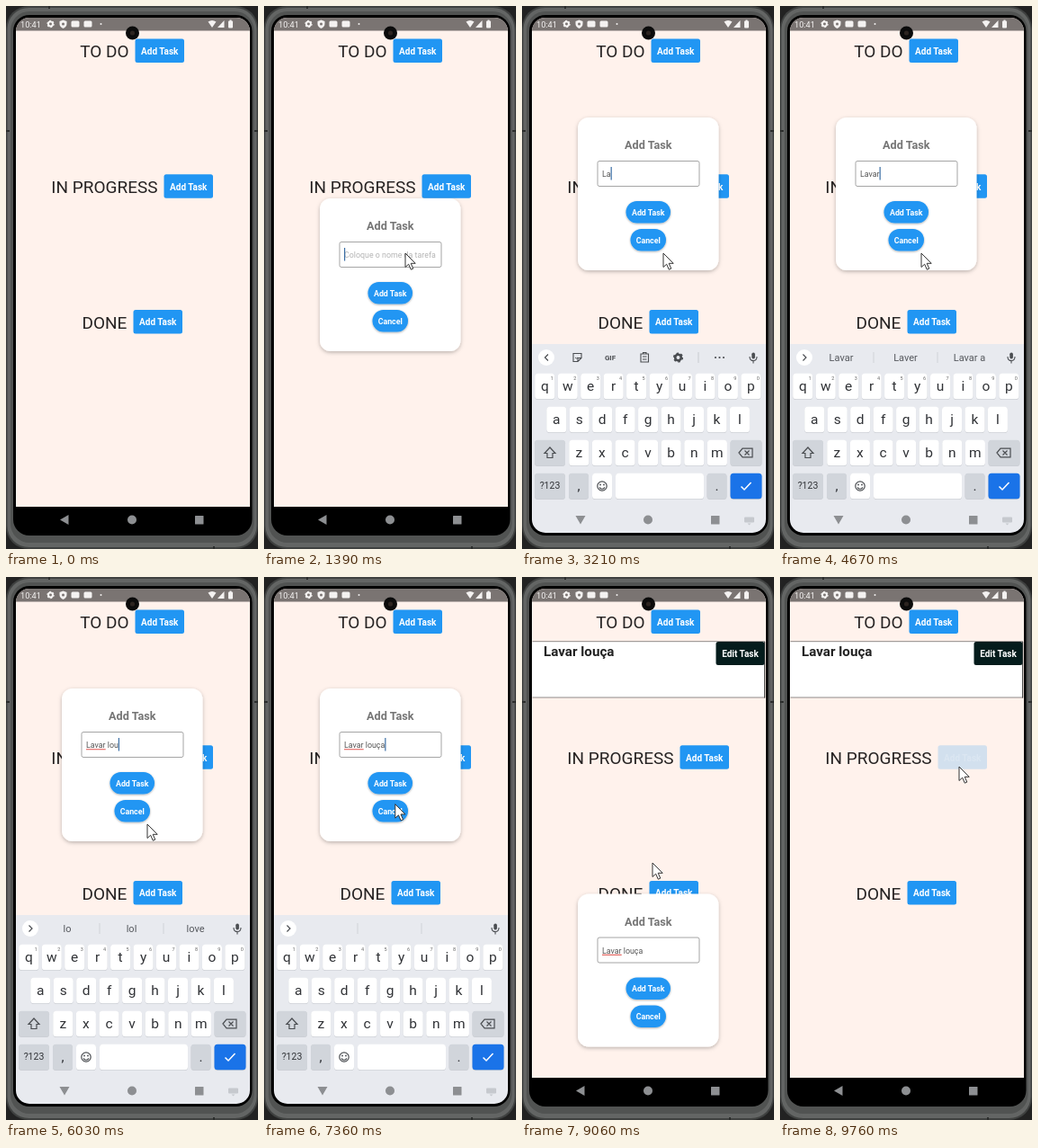
An HTML page that plays this animation: 280x604 px, repeating every 10000 ms.

```html
<!DOCTYPE html>
<html lang="pt">
<head>
<meta charset="utf-8">
<title>Task board</title>
<style>
html, body { margin: 0; width: 100%; height: 100%; overflow: hidden; background: #222; }
svg { display: block; width: 280px; height: 604px; font-family: Roboto, sans-serif; }
</style>
</head>
<body>
<svg id="stage" viewBox="0 0 280 604"></svg>
<script>
const BLUE = '#2196f3', BG = '#fff2ec', LOOP = 10000;

// Markup helpers
const rect = (x, y, w, h, fill, r = 0, more = '') =>
  `<rect x="${x}" y="${y}" width="${w}" height="${h}" rx="${r}" fill="${fill}" ${more}/>`;
const circle = (x, y, r, fill, more = '') => `<circle cx="${x}" cy="${y}" r="${r}" fill="${fill}" ${more}/>`;
const path = (d, fill, more = '') => `<path d="${d}" fill="${fill}" ${more}/>`;
const line = (d, color, w = 1.2, more = '') => path(d, 'none', `stroke="${color}" stroke-width="${w}" ${more}`);
const text = (x, y, size, fill, s, more = '') =>
  `<text x="${x}" y="${y}" font-size="${size}" fill="${fill}" ${more}>${s}</text>`;
const label = (x, y, size, fill, s, more = '') => text(x, y, size, fill, s, `text-anchor="middle" ${more}`);
const group = (id, body, more = '') => `<g id="${id}" ${more}>${body}</g>`;
const bold = 'font-weight="700"';

const button = (id, x, y, w, h, r, size, s, fill = BLUE, more = '') => group(id,
  rect(x, y, w, h, fill, r, more) + label(x + w / 2, y + h / 2 + size * .4, size, '#fff', s, bold));

const gear = (x, y, r, color) =>
  circle(x, y, r * .62, 'none', `stroke="${color}" stroke-width="${r * .5}"`) +
  circle(x, y, r * .9, 'none', `stroke="${color}" stroke-width="${r * .3}" stroke-dasharray="${r * .47}"`);

function phone() {
  return rect(0, 0, 280, 604, '#3f4140', 25) +
    rect(1.5, 2, 277, 600, '#636564', 24) +
    rect(5, 6, 270.5, 591, '#515352', 21) +
    rect(8, 10, 265.5, 579, '#000', 18) +
    rect(0, 138, 4, 2, '#2b2d2c') + rect(276, 138, 4, 2, '#2b2d2c') +
    rect(47, 0, 2, 3, '#2b2d2c') + rect(230, 601, 2, 3, '#2b2d2c');
}

function statusBar() {
  const c = '#f4f2f1';
  return rect(11, 13, 260, 14.5, '#7a7472') +
    text(16, 23.6, 9.2, c, '10:41') + gear(49.5, 20, 4, c) +
    path('M63.5 15.5l4 1.5v3q0 3-4 5q-4-2-4-5v-3z', c) + circle(63.5, 20, 1.5, '#7a7472') +
    rect(72.5, 16.5, 9, 7, c, 1.5) + rect(86.5, 16.5, 9, 7, c, 1.5) + circle(105.5, 20, 1, c) +
    path('M224.5 17.5q4.500-3 9 0l-4.500 6.500z', c) + path('M235 24h7.500v-8z', c) +
    rect(247, 16.5, 5, 8, c, 1) + rect(248.5, 15.5, 2, 2, c);
}

function board() {
  const row = (id, s, x, y, bx) =>
    text(x, y + 6.5, 19, '#262323', s) + button(id, bx, y - 14, 54.5, 26.5, 2.5, 10, 'Add Task');
  return rect(11, 13, 260, 544, BG) + rect(11, 557, 260, 29, '#000') +
    row('todoBtn', 'TO DO', 82.2, 50.5, 143.5) +
    row('progressBtn', 'IN PROGRESS', 50.3, 201.3, 175.5) +
    row('doneBtn', 'DONE', 84.5, 352, 141.5) +
    group('card', rect(11.5, 72, 258.5, 62, '#fff') +
      line('M11.5 71.700H270M11.500 134H270', '#8f8a88', 1) + line('M269.700 72V134.500', '#222', 1) +
      text(24, 88.2, 15.2, '#222', 'Lavar louça', bold) +
      button('editBtn', 215.5, 72, 54, 26, 2.5, 10, 'Edit Task', '#051c1c'));
}

function modal() {
  const lift = 'filter="url(#low)"';
  return group('modal', rect(62, 214, 156.5, 170, '#fff', 12, 'filter="url(#high)"') +
    label(140.3, 249.2, 12.65, '#757575', 'Add Task', bold) +
    rect(84, 262.5, 113, 28, '#fff', 2, 'stroke="#a5a5a5"') +
    text(89, 280, 8.85, '#b4b4b4', 'Coloque o nome da tarefa', 'id="hint"') +
    text(89, 280, 8.85, '#555', '', 'id="typed"') +
    line('M89 281.800h21.700', '#e0554f', 1.1, 'id="spell"') +
    rect(0, 269, 1.2, 14.5, '#3a6ea5', 0, 'id="caret"') +
    button('addBtn', 115.5, 307, 49.5, 24.5, 12.2, 8.85, 'Add Task', BLUE, lift) +
    button('cancelBtn', 120.5, 338, 39.5, 24.5, 12.2, 8.85, 'Cancel', BLUE, lift));
}

function keyboard() {
  const ink = '#4a4d51', dark = '#d1d5db';
  const key = (cx, cy, s, w = 22, fill = '#fff', size = 15.5) =>
    rect(cx - w / 2, cy - 14, w, 29, '#c9ccd2', 3.5) + rect(cx - w / 2, cy - 14.3, w, 28.5, fill, 3.5) +
    label(cx, cy + size * .33, size, '#303236', s);
  const letters = (s, x, y, step) => [...s].map((c, i) => key(x + i * step, y, c)).join('');
  const digits = [...'1234567890'].map((d, i) => label(33.3 + i * 25.45, 416, 5.5, '#666', d)).join('');
  const tools = line('M29 387.500l-3.500 3.500 3.500 3.500', ink) +
    line('M57 386.500h9v5l-4 4h-5zM66 391.500h-4v4', ink, 1.1) + line('M59 391q1.500 2 3 0', ink, 1) +
    label(98, 394, 8, ink, 'GIF', bold) +
    line('M132 387h8.500v9h-8.500zM134.500 387v-1.500h3.500v1.500M134 390h4.500M134 393h4.500', ink, 1.1) +
    gear(173.5, 391, 5.3, ink) + line('M196 385v12', '#c8cbd0', 1) +
    [215, 219.5, 224].map(x => circle(x, 391, 1.1, ink)).join('');
  const words = line('M25.500 387.500l3.500 3.500-3.500 3.500', ink) + line('M104 385v12M175 385v12', '#d0d3d8', 1) +
    [68, 139.5, 210.5].map(x => label(x, 395, 11, '#55585d', '', 'class="word"')).join('');
  return group('keys', rect(11, 376, 260, 230, '#e8eaef') + circle(27, 391, 9, '#fff') +
    group('tools', tools) + group('words', words) +
    rect(255.3, 385.5, 3.6, 7, ink, 1.8) + line('M253 390q0 4.500 4 4.500t4-4.500M257 394.500v3', ink, 1.1) +
    letters('qwertyuiop', 25.3, 423, 25.45) + digits +
    letters('asdfghjkl', 38.3, 460, 25.45) +
    key(31, 497, '', 34, dark) + line('M31 491l-6 6.500h3v5h6v-5h3z', ink) +
    letters('zxcvbnm', 63.3, 497, 25.6) +
    key(249, 497, '', 35, dark) + line('M241 497l4-4.800h11v9.600h-11zM247.500 494.500l5 5m0-5l-5 5', ink) +
    key(31, 534, '?123', 34, dark, 10.5) + key(63, 534, ',', 22, dark) +
    key(89, 534, '') + circle(89, 534, 5.2, 'none', `stroke="${ink}" stroke-width="1.2"`) +
    circle(87, 532.5, .9, ink) + circle(91, 532.5, .9, ink) + line('M86 535.500q3 3.500 6 0', ink) +
    key(153, 534, '', 98) + key(216.5, 534, '.', 22, dark) +
    key(249, 534, '', 35, '#1a73e8') + line('M243.500 534.500l3.500 3.500 7.500-8', '#fff', 1.5));
}

function navIcons() {
  const c = '#8d8f92';
  return path('M60 571.500l9.500-5.500v11z', c, 'id="back"') + circle(140, 571.5, 5, c) +
    rect(210, 567, 9.5, 9.5, c, .5) +
    group('switcher', rect(247, 568.5, 11, 6, '#c6c9ce', 1) + path('M250.500 575.500h4l-2 2z', '#c6c9ce'));
}

const shadow = (id, dy, blur, a) =>
  `<filter id="${id}" x="-20%" y="-20%" width="140%" height="150%">
  <feDropShadow dx="0" dy="${dy}" stdDeviation="${blur}" flood-opacity="${a}"/></filter>`;

const stage = document.getElementById('stage');
stage.innerHTML = `<defs>${shadow('high', 1.5, 2, .27)}${shadow('low', .8, .8, .35)}
  <clipPath id="screen">${rect(11, 13, 260, 573, '#000', 15)}</clipPath>
  <clipPath id="app">${rect(11, 13, 260, 544, '#000')}</clipPath></defs>` +
  phone() +
  `<g clip-path="url(#screen)">${board()}<g clip-path="url(#app)">${modal()}</g>
  ${keyboard()}${navIcons()}${statusBar()}</g>` +
  circle(140.5, 30, 7.5, '#0b0b0b') + circle(140.5, 30, 2.6, '#2c2420') +
  group('mouse', path('M0 0V15.500L3.700 12.200L6.300 18.200L8.800 17.100L6.200 11.300H11.200Z', '#fff',
    'stroke="#333" stroke-width="1" stroke-linejoin="round"'));

const el = {};
stage.querySelectorAll('[id]').forEach(e => el[e.id] = e);
const wordEls = stage.querySelectorAll('.word');

// Timeline: [start, value]
const TYPED = [[0, ''], [2910, 'L'], [3120, 'La'], [3450, 'Lav'], [3820, 'Lava'], [4060, 'Lavar'],
  [4940, 'Lavar '], [5150, 'Lavar l'], [5610, 'Lavar lo'], [5850, 'Lavar lou'],
  [6240, 'Lavar louç'], [6420, 'Lavar louça']];
const WORDS = [[0, ''], [3480, 'La,Last,Later'], [3850, 'Lav,Lava,Lavender'], [4240, 'Lava,Lavar,Lavender'],
  [4450, 'Lavar,Laver,Lavar a'], [4700, 'the,and,to'], [5180, 'l,love,like'], [5420, 'lo,lol,love'],
  [6120, 'lou,loud,lounge'], [6500, ',,']];
// Pointer: [time, x, y]
const MOUSE = [[90, 216, 182], [420, 172, 48], [760, 172, 48], [1090, 154, 203], [1390, 157, 275],
  [6879, 157, 275], [6880, 154, 274], [7090, 154, 274], [7600, 139, 235], [8110, 139, 235],
  [8400, 145, 318], [9180, 145, 318], [9600, 199, 211], [LOOP, 199, 211]];

const ramp = (t, a, b) => Math.min(1, Math.max(0, (t - a) / (b - a)));
const ease = p => p * p * (3 - 2 * p);
const at = (list, t) => list.filter(k => k[0] <= t).pop()[1];
const show = (e, on) => e.setAttribute('display', on ? 'inline' : 'none');
const move = (e, x, y) => e.setAttribute('transform', `translate(${x} ${y})`);
const fade = (e, o) => e.setAttribute('opacity', o);

// The face and the label of a pressed button fade separately
function press(e, t, down, up) {
  const o = 1 - .8 * (ramp(t, down, down + 110) - ramp(t, up, up + 150));
  for (const part of e.children) fade(part, o);
}

function pointer(t) {
  const i = MOUSE.findIndex(k => k[0] > t);
  const [a, x, y] = MOUSE[i - 1], [b, u, v] = MOUSE[i], p = ease(ramp(t, a, b));
  return [x + (u - x) * p, y + (v - y) * p];
}

function draw(t) {
  const typed = at(TYPED, t), words = at(WORDS, t);
  const up = ramp(t, 1750, 2020) - ramp(t, 7775, 8045);

  show(el.mouse, t >= 90);
  if (t >= 90) move(el.mouse, ...pointer(t));

  press(el.todoBtn, t, 450, 640);
  press(el.addBtn, t, 8260, 8370);
  press(el.progressBtn, t, 9640, LOOP);
  show(el.card, t >= 9000);

  const slide = t < 9000 ? 0 : (t - 8970) / 90 * 137;
  show(el.modal, t >= 700 && slide < 380);
  move(el.modal, 0, slide - (t >= 1850 && t < 7790 ? 90 : 0));
  show(el.hint, !typed);
  el.typed.textContent = typed;
  show(el.spell, t >= 4940);
  show(el.caret, t >= 1300 && t < 7775);
  // Trailing spaces are collapsed in SVG text, so their width is added here
  const gap = typed.endsWith(' ') ? 2.2 : 0;
  el.caret.setAttribute('x', 89 + (typed ? el.typed.getComputedTextLength() : 0) + gap);

  show(el.keys, up > 0);
  fade(el.keys, up);
  move(el.keys, 0, 104 * (1 - up));
  show(el.tools, !words);
  show(el.words, words);
  words.split(',').forEach((w, i) => wordEls[i].textContent = w);

  show(el.switcher, up === 1);
  el.back.setAttribute('transform', `rotate(${270 * up} 65 571.5)`);
}

function tick() {
  draw(performance.now() % LOOP);
  requestAnimationFrame(tick);
}
tick();
</script>
</body>
</html>
```
